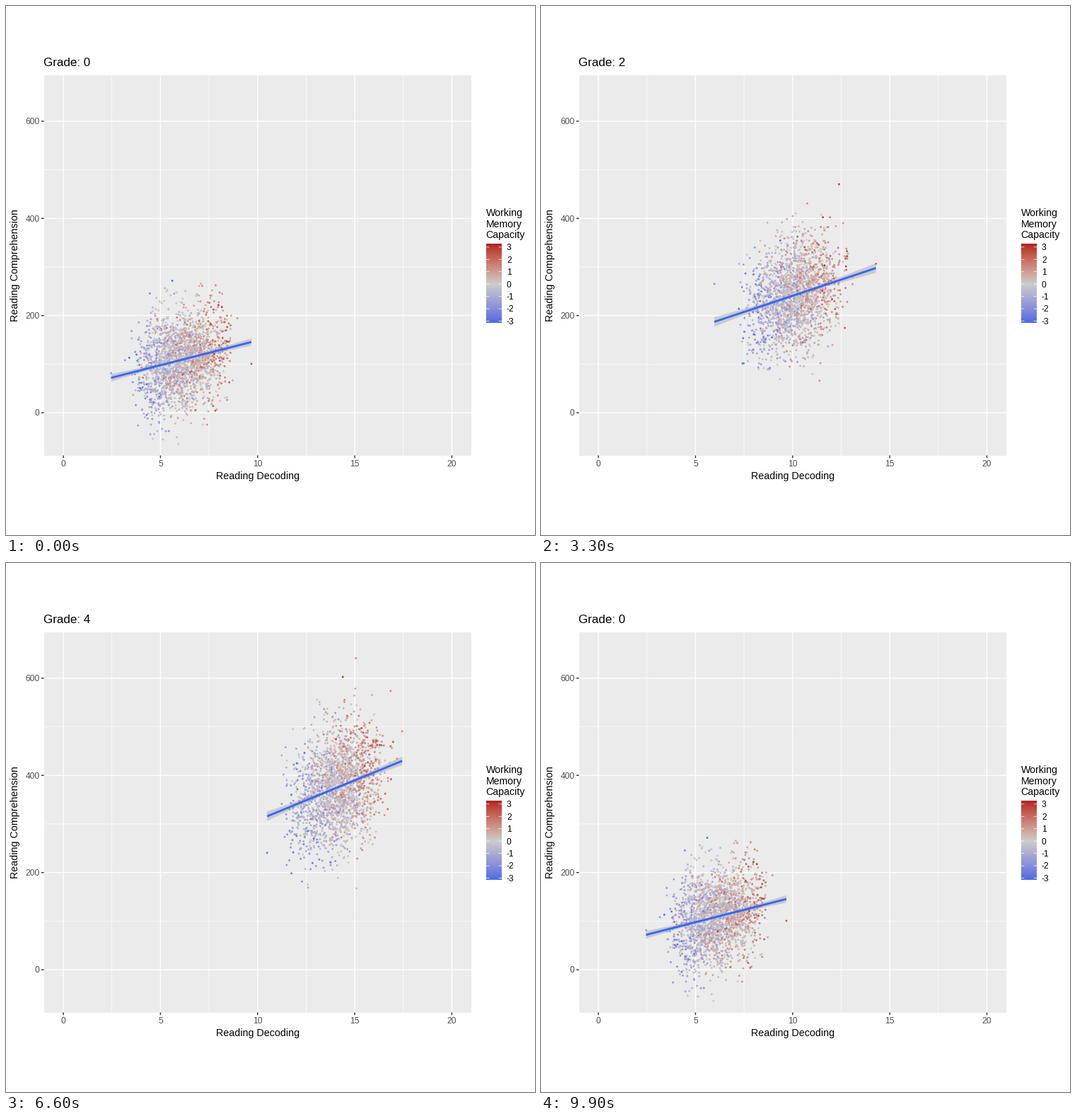
These frames come from a looping animation (748x748 px, 10 s). A matplotlib script:

```python
import numpy as np
import matplotlib.pyplot as plt
from matplotlib.animation import FuncAnimation
from matplotlib.patches import Polygon, Rectangle

plt.rcParams["font.family"] = "Liberation Sans"

SIZE, DPI = 748, 100
PX = 72 / DPI                      # one pixel in points
LEFT, RIGHT, TOP, BOTTOM = 53.7, 658, 98, 635.5
N = 2000
STEPS = 8
STARTS = [9, 26, 43, 59, 76, 92]   # first frame of each transition
WMC_LOW, WMC_HIGH = -3.15, 3.27
# lowest and highest decoding score per grade
SPANS = [(2.46, 9.68), (4.66, 12.82), (5.97, 14.29),
         (7.60, 15.55), (10.49, 17.44), (12.23, 19.50)]


def px(x):
    return 81.1 + 27.467 * np.asarray(x)


def py(y):
    return 575.1 - 0.687 * np.asarray(y)


# ---- diverging colour scale, mixed in Lab ----
TO_XYZ = np.array([[0.4124, 0.3576, 0.1805],
                   [0.2126, 0.7152, 0.0722],
                   [0.0193, 0.1192, 0.9505]])
WHITE = TO_XYZ.sum(axis=1)


def to_lab(code):
    c = np.array([int(code[i:i + 2], 16) for i in (1, 3, 5)]) / 255
    c = np.where(c > 0.04045, ((c + 0.055) / 1.055) ** 2.4, c / 12.92)
    x, y, z = np.cbrt(TO_XYZ @ c / WHITE)
    return np.array([116 * y - 16, 500 * (x - y), 200 * (y - z)])


def to_rgb(lab):
    y = (lab[:, 0] + 16) / 116
    f = np.stack([y + lab[:, 1] / 500, y, y - lab[:, 2] / 200], axis=1)
    c = np.clip((f ** 3 * WHITE) @ np.linalg.inv(TO_XYZ).T, 0, 1)
    return np.where(c > 0.0031308, 1.055 * c ** (1 / 2.4) - 0.055, 12.92 * c).clip(0, 1)


def ramp(v):
    low, mid, high = map(to_lab, ("#4169E1", "#CCCCCC", "#B22222"))
    t = (np.abs(v) / WMC_HIGH)[:, None]
    return to_rgb(mid + t * (np.where((v < 0)[:, None], low, high) - mid))


# ---- simulated pupils ----
rng = np.random.default_rng(11)


def noise():
    return rng.standard_normal(N)


def unit(v):
    return (v - v.mean()) / v.std()


def soften(v, limit=3.2):
    return limit * np.tanh(v / limit)


wmc = unit(noise()).clip(WMC_LOW, WMC_HIGH)
skill_x, skill_y = noise(), noise()


def make_grade(g):
    """Point cloud, confidence band and trend line of one grade, in pixels."""
    low, high = SPANS[g]
    mean, sd = 6.1 + 2 * g, 1.1
    level, slope, spread = 109 + 66.5 * g, 10.2 + 1.55 * g, 51 + 3 * g

    def fit(x):
        return level + slope * (x - mean)

    x = mean + sd * unit(soften(0.55 * wmc + 0.3 * skill_x + 0.78 * noise()))
    x[x.argmin()], x[x.argmax()] = low, high
    r = (0.05 + 0.06 * g) * wmc + 0.84 * skill_y + 0.45 * noise()
    r = unit(r - np.polyval(np.polyfit(x, r, 1), x))
    y = fit(x) + spread * r

    gx = np.linspace(low, high, 80)
    half = 1.96 * spread * np.sqrt((1 + ((gx - mean) / sd) ** 2) / N)
    band_x = np.concatenate([gx, gx[::-1]])
    band_y = np.concatenate([fit(gx) + half, (fit(gx) - half)[::-1]])
    return [np.column_stack([px(a), py(b)])
            for a, b in ((x, y), (band_x, band_y), (gx, fit(gx)))]


states = [make_grade(g) for g in range(len(SPANS))]

# ---- static parts ----
fig = plt.figure(figsize=(SIZE / DPI, SIZE / DPI), dpi=DPI, facecolor="white")
ax = fig.add_axes([0, 0, 1, 1])
ax.axis("off")


def line(x, y, color, width, z):
    return ax.plot(x, y, color=color, lw=width * PX, zorder=z,
                   solid_capstyle="butt", snap=False)[0]


def label(x, y, text, size, color="black", **kw):
    kw.setdefault("va", "baseline")
    return ax.text(x, y, text, fontsize=size * PX, color=color, **kw)


def grid(xs, ys, width, z):
    for v in xs:
        line([px(v)] * 2, [TOP, BOTTOM], "white", width, z)
    for v in ys:
        line([LEFT, RIGHT], [py(v)] * 2, "white", width, z)


ax.add_patch(Rectangle((LEFT, TOP), RIGHT - LEFT, BOTTOM - TOP,
                       fc="#EBEBEB", ec="none", zorder=0))
x_ticks, y_ticks = range(0, 21, 5), range(0, 601, 200)
grid(np.arange(2.5, 20, 5), range(100, 501, 200), 0.71, 1)
grid(x_ticks, y_ticks, 1.42, 2)
for v in x_ticks:
    line([px(v)] * 2, [BOTTOM, BOTTOM + 3.7], "#333333", 1.42, 2)
    label(px(v), 651, str(v), 12, "#4D4D4D", ha="center")
for v in y_ticks:
    line([LEFT - 3.7, LEFT], [py(v)] * 2, "#333333", 1.42, 2)
    label(47.5, py(v) + 4.3, str(v), 12, "#4D4D4D", ha="right")

label(355.6, 669, "Reading Decoding", 14.2, ha="center")
label(13.5, 367, "Reading Comprehension", 14.2, ha="center", va="center", rotation=90)
title = label(53.2, 85, "", 17)

# legend
for i, word in enumerate(("Working", "Memory", "Capacity")):
    label(678.6, 297 + 15.7 * i, word, 14.1)
bar = ramp(np.linspace(WMC_HIGH, WMC_LOW, 112))[:, None, :]
ax.imshow(bar, extent=(679, 701, 448, 336), aspect="auto",
          interpolation="bilinear", zorder=1)
for v in range(-3, 4):
    y = 393.2 - 17.45 * v
    line([679, 683.4], [y, y], "white", 0.71, 2)
    line([696.6, 701], [y, y], "white", 0.71, 2)
    label(708, y + 4.3, str(v), 12)

# ---- moving parts ----
dots = ax.scatter(*states[0][0].T, s=(2.9 * PX) ** 2, c=ramp(wmc),
                  linewidths=0, zorder=3)
band = ax.add_patch(Polygon(states[0][1], closed=True, fc="#999999",
                            ec="none", alpha=0.4, zorder=4))
trend = line(*states[0][2].T, "#3366FF", 2.85, 5)
ax.set_xlim(0, SIZE)
ax.set_ylim(SIZE, 0)


def position(frame):
    return sum(min(max((frame - s + 1) / STEPS, 0), 1) for s in STARTS)


def draw(frame):
    pos = position(frame)
    k = int(pos)
    t = pos - k
    now, after = states[k % 6], states[(k + 1) % 6]
    points, edge, fit = [a + (b - a) * t for a, b in zip(now, after)]
    dots.set_offsets(points)
    band.set_xy(edge)
    trend.set_data(fit[:, 0], fit[:, 1])
    title.set_text(f"Grade: {int(pos + 0.5) % 6}")
    return dots, band, trend, title


anim = FuncAnimation(fig, draw, frames=100, interval=100, repeat=True,
                     repeat_delay=0, blit=False)
plt.show()
```
